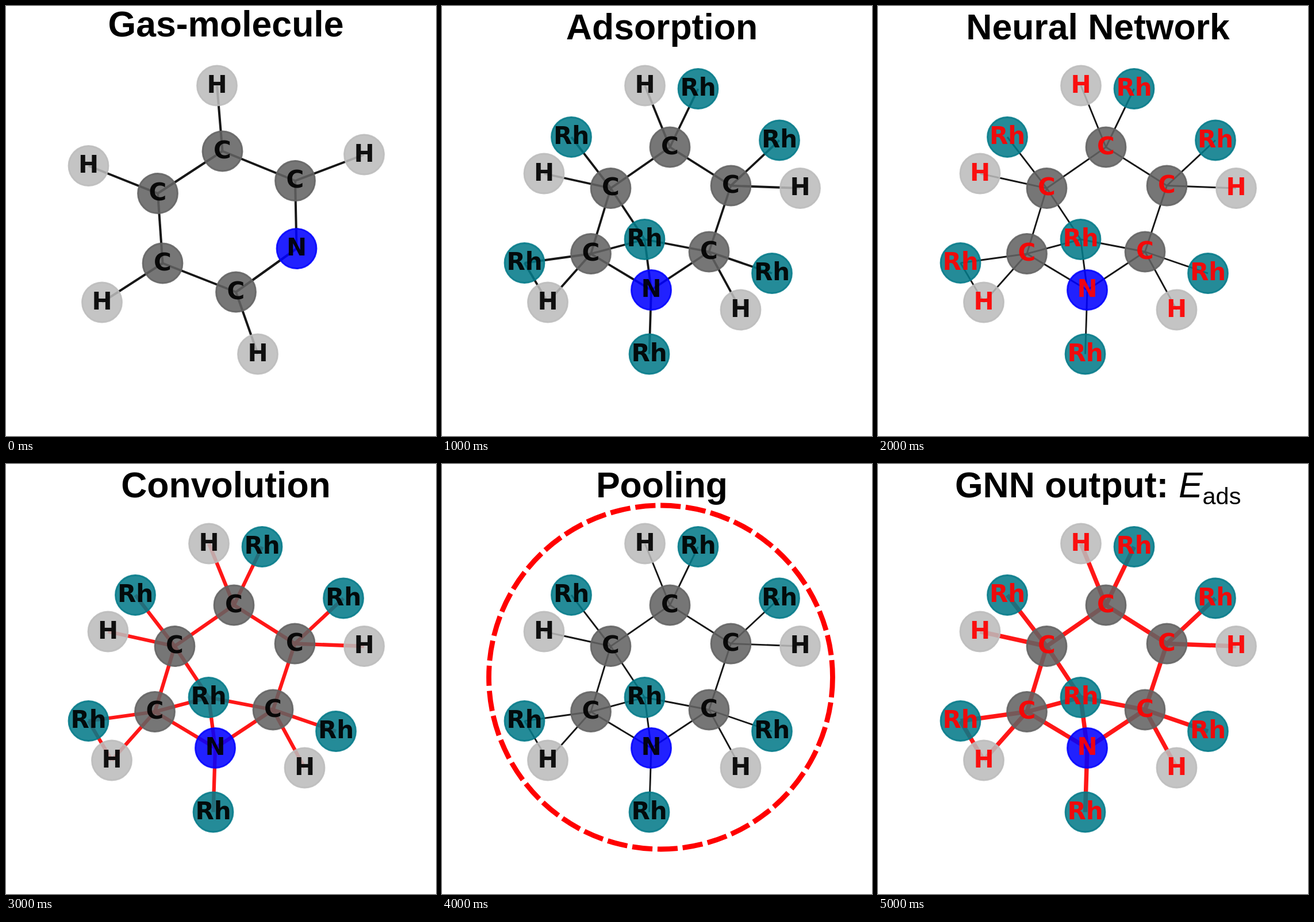
An HTML page for the animation above (6000 ms loop, 748 by 748 pixels).

```html
<!DOCTYPE html>
<html lang="en">
<head>
<meta charset="utf-8">
<title>Molecule graph steps</title>
<style>
html, body { margin: 0; width: 100%; height: 100%; overflow: hidden; background: #fff; }
#strip { display: flex; width: 600%; height: 100%; }
svg { display: block; width: calc(100% / 6); height: 100%; flex: none; }
.title { font: bold 62.5px "Liberation Sans", Arial, sans-serif; }
.plain { font-weight: normal; }
.label { font: bold 42px "DejaVu Sans", Verdana, sans-serif; text-anchor: middle; opacity: .92; }
.bond { opacity: .91; }
.atom { fill-opacity: .87; stroke-opacity: .87; stroke-width: 2.8; }
</style>
</head>
<body>
<div id="strip"></div>
<script>
const SCENE_MS = 1000;
const COLORS = { H: '#bcbcbc', C: '#626262', N: '#0000ff', Rh: '#047a89' };
const BLACK = '#000', RED = '#ff0000';

const gas = {
  atoms: [
    ['H', 367, 138.5], ['C', 376.5, 252.5], ['H', 623, 258.5], ['C', 503, 304],
    ['N', 505.5, 422], ['C', 400, 497.5], ['H', 438, 605.5], ['C', 272.5, 447.5],
    ['H', 167, 515.5], ['C', 264, 326], ['H', 143.5, 278]
  ],
  bonds: [[0, 1], [1, 3], [2, 3], [3, 4], [4, 5], [5, 6], [5, 7], [7, 8], [7, 9], [9, 10], [1, 9]]
};

const adsorbed = {
  atoms: [
    ['H', 353, 138.5], ['Rh', 445.5, 144], ['C', 396.5, 245.5], ['Rh', 225, 228],
    ['H', 177.5, 291.5], ['C', 293.5, 317], ['Rh', 587, 233.5], ['C', 502.5, 312.5],
    ['H', 623, 317], ['Rh', 352.5, 406], ['C', 259, 431], ['C', 464.5, 427.5],
    ['N', 364, 494], ['Rh', 143.5, 447], ['H', 184, 515.5], ['Rh', 574, 465],
    ['H', 519.5, 528.5], ['Rh', 360.5, 605.5]
  ],
  bonds: [
    [0, 2], [1, 2], [2, 5], [2, 7], [3, 5], [4, 5], [5, 10], [5, 9], [6, 7], [7, 8], [7, 11],
    [9, 10], [9, 11], [9, 12], [10, 12], [11, 12], [10, 13], [10, 14], [13, 14],
    [11, 15], [11, 16], [12, 17]
  ]
};

const heading = (text, y = 58) =>
  `<text class="title" x="382.5" y="${y}" text-anchor="middle">${text}</text>`;

const energyHeading =
  `<text class="title" y="58"><tspan x="134">GNN output:</tspan>` +
  `<tspan class="plain" x="523" font-style="italic">E</tspan>` +
  `<tspan class="plain" x="564.5" y="70" style="font-size:41.5px">ads</tspan></text>`;

const ring = `<circle cx="380.5" cy="371" r="299" fill="none"
  stroke="${RED}" stroke-width="8.8" stroke-dasharray="35.2 8.8"/>`;

function drawGraph({ atoms, bonds }, bondColor, bondWidth, labelColor) {
  const lines = bonds.map(([a, b]) => {
    const [, x1, y1] = atoms[a], [, x2, y2] = atoms[b];
    return `<line class="bond" x1="${x1}" y1="${y1}" x2="${x2}" y2="${y2}"
      stroke="${bondColor}" stroke-width="${bondWidth}"/>`;
  });
  const discs = atoms.map(([el, x, y]) =>
    `<circle class="atom" cx="${x}" cy="${y}" r="34.5" fill="${COLORS[el]}" stroke="${COLORS[el]}"/>`);
  const labels = atoms.map(([el, x, y]) =>
    `<text class="label" x="${x}" y="${y + 12}" fill="${labelColor}">${el}</text>`);
  return [...lines, ...discs, ...labels].join('');
}

const scenes = [
  heading('Gas-molecule', 53) + drawGraph(gas, BLACK, 4, BLACK),
  heading('Adsorption') + drawGraph(adsorbed, BLACK, 3.8, BLACK),
  heading('Neural Network') + drawGraph(adsorbed, BLACK, 2.9, RED),
  heading('Convolution') + drawGraph(adsorbed, RED, 6.3, BLACK),
  heading('Pooling') + ring + drawGraph(adsorbed, BLACK, 2.9, BLACK),
  energyHeading + drawGraph(adsorbed, RED, 7.5, RED)
];

const strip = document.getElementById('strip');
strip.innerHTML = scenes.map(s => `<svg viewBox="0 0 748 748">${s}</svg>`).join('');
strip.animate(
  [{ transform: 'translateX(0)' }, { transform: 'translateX(-100%)' }],
  { duration: scenes.length * SCENE_MS, iterations: Infinity, easing: `steps(${scenes.length}, end)` }
);
</script>
</body>
</html>
```
